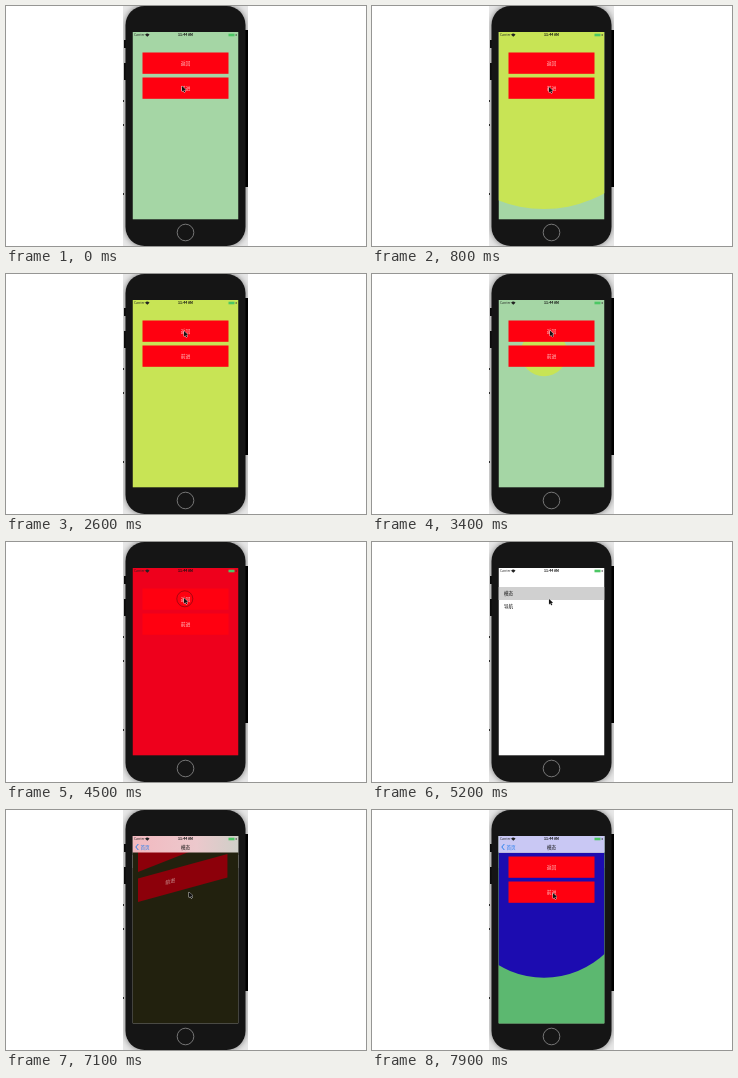
Recreate the animation shown at these times as an HTML page with a canvas. Size 360 by 240 pixels, loop 8000 ms.

```html
<!DOCTYPE html>
<html lang="zh">
<meta charset="utf-8">
<style>
html, body { margin: 0; width: 100%; height: 100%; overflow: hidden; background: #fff }
canvas { display: block; width: 360px; height: 240px }
</style>
<canvas width="360" height="240"></canvas>
<script>
const c = document.querySelector('canvas').getContext('2d');
const LOOP = 8000, X = 126.5, Y = 26, W = 106, H = 187.6;
const GREEN = '#a5d6a5', YELLOW = '#c8e455', BROWN = '#a83030', RED = '#ee001c';
const NAV_GREEN = '#5cb870', BLUE = '#1c0cb0';

// start, page below, page above, direction of the circle
const reveals = [
  [380, GREEN, YELLOW, 1], [1080, YELLOW, BROWN, 1],
  [2000, YELLOW, BROWN, -1], [2920, GREEN, YELLOW, -1],
  [3860, RED, GREEN, -1], [4620, null, RED, -1]
];
const taps = [220, 920, 1860, 2780, 3720, 4370, 6070, 7430];
const path = [[0, 176, 80], [1600, 178, 82], [1740, 178, 82], [1850, 178, 57], [2600, 178, 57],
  [4500, 178, 56], [5200, 177, 57], [5900, 171, 66], [6250, 171, 66], [7100, 183, 82],
  [7400, 181, 83], [8000, 181, 83]];

const part = (t, a, b) => Math.max(0, Math.min(1, (t - a) / (b - a)));
function box(color, x, y, w, h) { c.fillStyle = color; c.fillRect(x, y, w, h); }
function text(s, x, y, size, color, align = 'center', weight = 400) {
  c.font = `${weight} ${size}px "Noto Sans CJK SC", "Noto Sans CJK", "Liberation Sans", sans-serif`;
  c.textAlign = align;
  c.textBaseline = 'middle';
  c.fillStyle = color;
  c.fillText(s, x, y);
}
function ring(x, y, r, color, width) {
  c.beginPath();
  c.arc(x, y, r, 0, 7);
  c.strokeStyle = color;
  c.lineWidth = width;
  c.stroke();
}

function phone() {
  box('#fff', 0, 0, 360, 240);
  c.save();
  c.beginPath();
  c.rect(117, 0, 125, 240);
  c.clip();
  box('#e8e8e8', 117, 0, 125, 240);
  box('#000', 238, 24, 4, 157);
  for (const y of [94, 118, 187]) box('#333', 117, y, 1, 2);
  box('#111', 118, 34, 3, 8);
  box('#111', 118, 57, 3, 17);
  c.shadowColor = 'rgba(0,0,0,.5)';
  c.shadowBlur = 6;
  c.fillStyle = '#151515';
  c.beginPath();
  c.roundRect(119.5, 0, 120, 240, 19);
  c.fill();
  c.restore();
  ring(179.5, 226.5, 8.3, '#808080', 0.9);
}

function list() {
  box('#fff', X, Y, W, H);
  box('#d0d0d0', X, 45, W, 13);
  text('模态', 132, 51.5, 4.6, '#111', 'left');
  text('导航', 132, 64.5, 4.6, '#111', 'left');
}

// k tilts and darkens the buttons, each by its own angle
function buttons(k = 0) {
  const dim = Math.min(k, 1);
  const red = `rgb(${255 - 115 * dim},0,${16 - 6 * dim})`;
  [['返回', 46.5, -8, -0.41], ['前进', 71.5, -3, -0.285]].forEach(([s, y, rise, tilt]) => {
    c.save();
    c.translate(136.5 - 4.5 * k, y + rise * k);
    c.transform(1 + 0.04 * k, tilt * k, 0, 1 + 0.1 * k, 0, 0);
    box(red, 0, 0, 86, 21.3);
    text(s, 43 - 12 * k, 10.6, 4.8, dim > 0.5 ? '#c99' : '#ffc4c4');
    c.restore();
  });
}

function circlePage(below, above, p) {
  if (below) box(below, X, Y, W, H); else list();
  c.save();
  c.beginPath();
  c.arc(172, 79, 165 * p, 0, 7);
  c.clip();
  box(above, X, Y, W, H);
  if (!below) buttons();
  c.restore();
  if (below) buttons();
}

function navPage(t) {
  list();
  c.globalAlpha = part(t, 6350, 6700);
  box('#22210e', X, Y, W, H);
  c.globalAlpha = part(t, 7120, 7420);
  box(NAV_GREEN, X, Y, W, H);
  c.globalAlpha = 1;
  if (t > 7600) circlePage(NAV_GREEN, BLUE, part(t, 7600, 8160));
  else if (t > 6650) buttons(part(t, 7400, 6800) * 2);
}

function navBar(t) {
  c.globalAlpha = part(t, 6400, 6650);
  const g = c.createLinearGradient(X, 0, X + W, 0);
  g.addColorStop(0, '#f3b9c0');
  g.addColorStop(0.6, '#ecc8cc');
  g.addColorStop(1, '#cfcfc8');
  box(g, X, Y, W, 16.5);
  c.globalAlpha = part(t, 7150, 7420);
  box('#d4ebd8', X, Y, W, 16.5);
  c.globalAlpha = part(t, 7600, 7800);
  box('#c9c8f4', X, Y, W, 16.5);
  c.globalAlpha = part(t, 6450, 6800);
  c.strokeStyle = '#1678ee';
  c.lineWidth = 0.9;
  c.beginPath();
  c.moveTo(132.3, 34);
  c.lineTo(129.8, 37);
  c.lineTo(132.3, 40);
  c.stroke();
  text('首页', 134.5, 37, 4.6, '#2a80ee', 'left');
  text('模态', 179.5, 37, 4.6, '#111', 'center', 500);
  c.globalAlpha = 1;
}

function statusBar() {
  text('Carrier', 128, 29, 3.3, '#222', 'left');
  text('11:44 AM', 179.5, 29, 3.4, '#111', 'center', 700);
  c.fillStyle = '#222';
  c.beginPath();
  c.moveTo(141.3, 30.8);
  c.arc(141.3, 30.8, 3, -2.4, -0.74);
  c.fill();
  box('#4cc764', 222.5, 27.7, 6, 2.6);
  box('#333', 229.5, 28.5, 1.5, 1);
}

function pointer(t) {
  const i = path.findIndex(p => p[0] > t);
  const [a, b] = [path[i - 1], path[i]];
  const u = part(t, a[0], b[0]), e = u * u * (3 - 2 * u);
  const x = a[1] + (b[1] - a[1]) * e, y = a[2] + (b[2] - a[2]) * e;
  const tap = taps.find(s => t >= s && t < s + 180);
  if (tap !== undefined) {
    c.globalAlpha = 1 - part(t, tap + 40, tap + 180);
    ring(x + 0.8, y + 0.8, 8, '#111', 1);
    c.globalAlpha = 1;
  }
  c.beginPath();
  [[0, 0], [0, 5.4], [1.3, 4.3], [2.2, 6.3], [3.2, 5.8], [2.3, 3.9], [4, 3.8]]
    .forEach(([dx, dy]) => c.lineTo(x + dx, y + dy));
  c.closePath();
  c.strokeStyle = '#ddd';
  c.lineWidth = 0.9;
  c.stroke();
  c.fillStyle = '#111';
  c.fill();
}

function draw(now) {
  const t = now % LOOP;
  phone();
  c.save();
  c.beginPath();
  c.rect(X, Y, W, H);
  c.clip();
  if (t > 6200) {
    navPage(t);
    navBar(t);
  } else {
    const [start, below, above, dir] = reveals.findLast(r => t >= r[0]) || reveals[0];
    const p = part(t, start, start + 560);
    circlePage(below, above, dir > 0 ? p : 1 - p);
  }
  statusBar();
  c.restore();
  pointer(t);
  requestAnimationFrame(draw);
}
requestAnimationFrame(draw);
</script>
</html>
```
